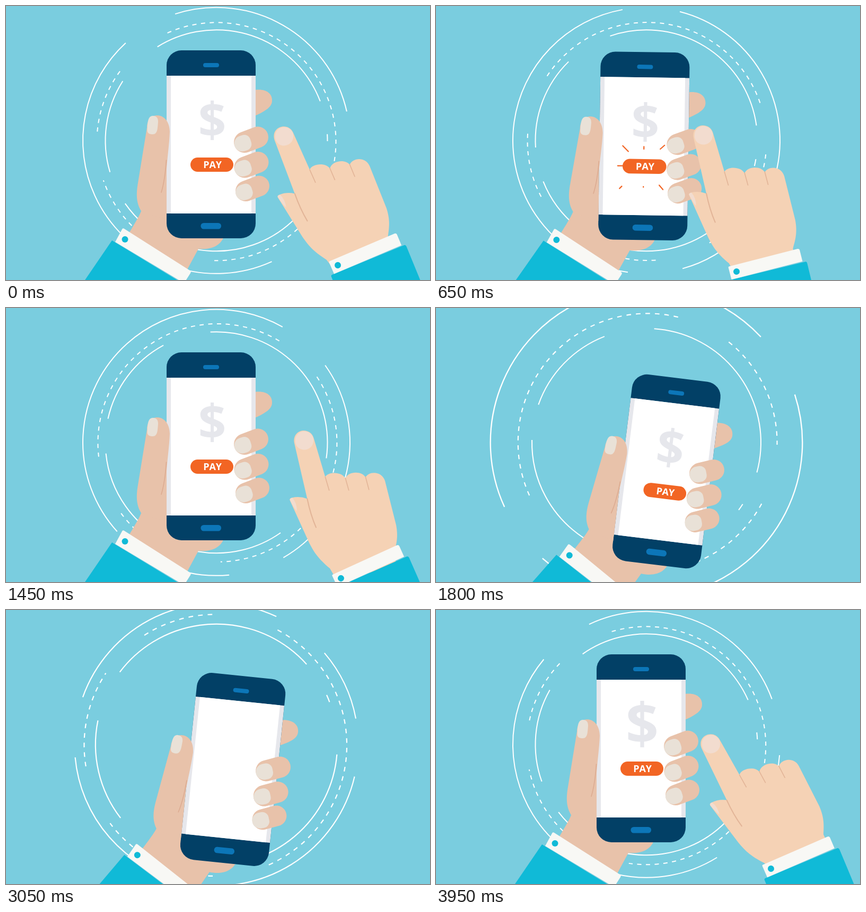
An HTML page with a canvas that plays this animation: 800x519 px, repeating every 4000 ms.

```html
<!DOCTYPE html>
<html lang="en">
<head>
<meta charset="utf-8">
<title>Mobile payment</title>
<style>
html, body { margin: 0; width: 100%; height: 100%; overflow: hidden; background: #7acddf; }
canvas { display: block; width: 800px; height: 519px; }
</style>
</head>
<body>
<canvas id="stage" width="800" height="519"></canvas>
<script>
const ctx = document.getElementById('stage').getContext('2d');
const LOOP = 4000, STEP = 50;
const RAD = Math.PI / 180;
const FONT = '"Open Sans", "Noto Sans", sans-serif';
const COLOR = {
  sky: '#7acddf', navy: '#024066', blue: '#0c76b8', bezel: '#e6e7ec', orange: '#f26524',
  skin: '#e8c2aa', crease: '#dcab91', nail: '#e9e1d7',
  skin2: '#f5d2b5', crease2: '#e2b497', nail2: '#f2dccf',
  cuff: '#f8f8f5', teal: '#10bad7'
};

const clamp = u => Math.max(0, Math.min(1, u));
const smooth = u => u * u * (3 - 2 * u);
const mix = (a, b, u) => a + (b - a) * u;
const backIn = (u, s) => (s + 1) * u ** 3 - s * u ** 2;
const backOut = (u, s = 1.70158) => 1 - backIn(1 - u, s);

// Eased interpolation through rows of [time, ...values].
function track(rows, t) {
  const i = rows.findIndex(row => row[0] > t);
  if (i === 0) return rows[0].slice(1);
  if (i < 0) return rows[rows.length - 1].slice(1);
  const a = rows[i - 1], b = rows[i];
  const u = smooth((t - a[0]) / (b[0] - a[0]));
  return a.slice(1).map((v, k) => mix(v, b[k + 1], u));
}

function group(draw) {
  ctx.save();
  draw();
  ctx.restore();
}

function rotateAbout(x, y, degrees) {
  ctx.translate(x, y);
  ctx.rotate(degrees * RAD);
  ctx.translate(-x, -y);
}

function scaleAbout(x, y, s) {
  ctx.translate(x, y);
  ctx.scale(s, s);
  ctx.translate(-x, -y);
}

function fill(path, color) {
  ctx.fillStyle = color;
  ctx.fill(new Path2D(path));
}

function stroke(path, color, width) {
  ctx.strokeStyle = color;
  ctx.lineWidth = width;
  ctx.lineCap = 'round';
  ctx.stroke(new Path2D(path));
}

function box(x, y, w, h, r, color) {
  ctx.fillStyle = color;
  ctx.beginPath();
  ctx.roundRect(x, y, w, h, r);
  ctx.fill();
}

function dot(x, y, r, color) {
  ctx.fillStyle = color;
  ctx.beginPath();
  ctx.arc(x, y, r, 0, 2 * Math.PI);
  ctx.fill();
}

// ---------- rings ----------
const RINGS = [
  { r: 252, speed: 50, exit: [1600, 520, 2.47], enter: 2850,
    arcs: [[252, 347.4], [12, 41.8], [65.5, 227.2]] },
  { r: 225.5, speed: -50, exit: [1660, 470, 1.77], enter: 2800, shift: 2, dash: [8, 8.5],
    arcs: [[245.8, 375], [38.8, 91], [118.3, 161], [184.8, 217.6]] },
  { r: 209.5, speed: 20, exit: [1720, 420, 1.29], enter: 2750,
    arcs: [[237.9, 339.2], [356.7, 360.3], [25.7, 145.3], [163.4, 212.5]] }
];

function ringScale(ring, t) {
  if (t >= 2700) return backOut(clamp((t - ring.enter) / 450));
  const [start, length, s] = ring.exit;
  return 1 - backIn(clamp((t - start) / length), s);
}

function drawRing(ring, t) {
  const s = ringScale(ring, t);
  if (s < 0.01) return;
  const spin = t < 2700 ? t : t - LOOP - 98;
  group(() => {
    ctx.translate(397, 254.8);
    ctx.scale(s, s);
    ctx.rotate(ring.speed * spin / 1000 * RAD);
    ctx.translate(0, ring.shift || 0);
    ctx.strokeStyle = '#fff';
    ctx.lineWidth = 2;
    ctx.setLineDash(ring.dash || []);
    for (const [from, to] of ring.arcs) {
      ctx.beginPath();
      ctx.arc(0, 0, ring.r, from * RAD, to * RAD);
      ctx.stroke();
    }
  });
}

// ---------- phone ----------
// Outer end relative to the button, direction inward, full length.
const RAYS = [
  [-42, -38, 45, 25], [-2, -37, 90, 8], [37, -40, 138, 18], [-51, 0, 0, 17],
  [-47, 43, -45, 10], [-2, 40, -90, 2], [35, 44, -131, 18]
];

function drawRays(t) {
  const p = (t - 500) / 215;
  if (p <= 0 || p >= 1) return;
  const head = 1 - clamp(p * 2), tail = 1 - clamp(p * 2 - 1);
  for (const [x, y, angle, length] of RAYS) {
    const dx = Math.cos(angle * RAD) * length, dy = Math.sin(angle * RAD) * length;
    const at = k => `${389 + x + dx * k} ${300 + y + dy * k}`;
    stroke(`M${at(head)}L${at(tail)}`, COLOR.orange, 2.2);
  }
}

function drawDollar(t) {
  const s = t < 2700 ? 1 : backOut(clamp((t - 3650) / 450), 2.9);
  if (s <= 0) return;
  group(() => {
    ctx.translate(389, 216);
    ctx.scale(s, s);
    ctx.font = `bold 92px ${FONT}`;
    ctx.textAlign = 'center';
    ctx.fillStyle = COLOR.bezel;
    const m = ctx.measureText('$');
    ctx.fillText('$', 0, (m.actualBoundingBoxAscent - m.actualBoundingBoxDescent) / 2);
  });
}

const PRESS = [[420, 1], [480, 0.9], [590, 1.05], [650, 1.02], [760, 1]];

function drawButton(t) {
  const s = t < 2700 ? track(PRESS, t)[0] : backOut(clamp((t - 3335) / 400));
  if (s <= 0) return;
  group(() => {
    scaleAbout(388.5, 300.5, s);
    box(348, 287, 81, 27, 13.5, COLOR.orange);
    ctx.font = `bold 18px ${FONT}`;
    ctx.letterSpacing = '0.8px';
    ctx.textAlign = 'center';
    ctx.fillStyle = '#fff';
    ctx.fillText('PAY', 390, 307);
  });
}

function drawPhone(t) {
  box(303, 84, 168, 356, 28, COLOR.navy);
  box(303, 132, 168, 261, 0, COLOR.bezel);
  box(311, 132, 152, 261, 0, '#fff');
  box(372, 108, 30, 8, 4, COLOR.blue);
  box(367.5, 411, 38.5, 11.5, 5.5, COLOR.blue);
  drawDollar(t);
  drawRays(t);
  drawButton(t);
}

// ---------- holding hand ----------
function drawFinger(x, y, r) {
  ctx.lineCap = 'round';
  stroke(`M${x} ${y}L${x + 25} ${y - 9.5}`, COLOR.skin, 2 * r);
  group(() => {
    ctx.translate(x - 3, y + 2);
    ctx.rotate(-18 * RAD);
    box(-16.5, -15, 32, 30, [15, 12, 12, 15], COLOR.nail);
  });
}

function drawHoldingArm() {
  fill('M200 444 L336 527 L215 720 L60 650 L149 519Z', COLOR.teal);
  fill('M219.5 422 Q221 420.5 224 422.5 L347 501 Q350 503 348 506 L336 525 L206 447Z', COLOR.cuff);
  dot(224.5, 442, 6, COLOR.teal);
}

function holdAngle(t) {
  if (t < 2700) return 7 * Math.max(0, (t - 1650) / 150) ** 2;
  return 58 * (1 - backOut(clamp((t - 2850) / 680)));
}

const RECOIL = [[380, 0], [520, 0.95], [650, 0.8], [950, 0]];

function drawHolding(t) {
  if (t >= 2150 && t <= 2850) return;
  const angle = holdAngle(t);
  const pivot = (x, y, a) => angle < 0 ? rotateAbout(x, y, a) : rotateAbout(22, 678, angle);
  group(() => {
    rotateAbout(157, 646, track(RECOIL, t)[0]);
    group(() => {
      pivot(181, 470, angle);
      fill('M465 160 C488 155 502 164 502 179 C502 190 493 198 465 210Z', COLOR.skin);
      fill('M262 365 C256 395 246 405 226 441 L335 512 L363 460 C386 462 406 455 412 434 L330 330Z', COLOR.skin);
    });
    group(() => {
      pivot(14, 563, angle * 0.48);
      drawHoldingArm();
    });
    group(() => {
      pivot(181, 470, angle);
      drawPhone(t);
      fill('M266 230 C266 199 308 198 309 238 C308 264 304 290 303 310 V405 L257 391 C246 376 245 358 249 335Z', COLOR.skin);
      fill('M266.5 233 C267 217 269 208 277 208 C284 208 287 212 287 219 C286 232 286 243 277 243 C270 243 266 241 266.5 233Z', COLOR.nail);
      stroke('M302.5 292 Q300 330 293 353', COLOR.crease, 1.6);
      drawFinger(450, 258, 20);
      drawFinger(450.5, 305.5, 20);
      drawFinger(452.5, 350.5, 19.5);
    });
  });
}

// ---------- tapping hand ----------
// time, fingertip x, y, hand angle, cuff button x, y, arm angle
const TAP = [
  [0, 524, 247, -6.2, 626, 491, -7.2],
  [430, 420, 306, -4, 510, 553, -6],
  [510, 420, 306, -4, 510, 553, -6],
  [650, 504, 245, 1.5, 567, 503, 1.5],
  [1000, 560, 247, 1.5, 628, 506, -5],
  [1450, 562, 251, 1.4, 632, 512, -8.7],
  [1750, 700, 640, 8, 790, 890, 5],
  [2950, 700, 640, 8, 790, 890, 5],
  [3350, 581, 182, 0, 652, 436, 0],
  [3950, 518, 254, -11.4, 632, 490, -7.6],
  [4000, 520, 252, -9.7, 630, 490, -7.5]
];

function drawTapHand() {
  fill('M563 187 C558 160 593 155 599.5 177 L623 250 C628 239 655 239 661 252 C666 237 693 237 699 249 '
    + 'C705 236 730 236 736 255 L759 338 C764 362 760 376 756 392 L762 415 L650 446 L636 423 '
    + 'C612 404 604 391 595 374 L557.5 296 Q556 292 561 291 Q575 287 590 292Z', COLOR.skin2);
  fill('M565 186 C562 160 594 158 599 178 C602 203 569 207 565 186Z', COLOR.nail2);
  fill('M557.5 295 Q557 292 562 291 Q571 301 571 316 Q565 310 557.5 295Z', COLOR.nail2);
  stroke('M590 292 Q597 322 608 346', COLOR.crease2, 2);
  stroke('M623 250 L631 275', COLOR.crease2, 1.6);
  stroke('M661 251 L668 274', COLOR.crease2, 1.6);
  stroke('M699 248 L706 272', COLOR.crease2, 1.6);
}

function drawTapArm() {
  fill('M637 455 Q637 453 639 452.5 L781 414 Q784 413.5 785 417 L850 660 L692 670Z', COLOR.teal);
  fill('M636.5 429 Q636 427 638 426.5 L766 390 Q769 389.5 770 392 L776 413.5 L643 451.5Z', COLOR.cuff);
  dot(652, 436, 6, COLOR.teal);
}

function drawTapping(t) {
  if (t >= 1750 && t <= 2950) return;
  const [tipX, tipY, handAngle, armX, armY, armAngle] = track(TAP, t);
  const place = (x, y, angle, homeX, homeY, draw) => group(() => {
    ctx.translate(x, y);
    ctx.rotate(angle * RAD);
    ctx.translate(-homeX, -homeY);
    draw();
  });
  place(tipX, tipY, handAngle, 581, 182, drawTapHand);
  place(armX, armY, armAngle, 652, 436, drawTapArm);
}

// ---------- loop ----------
function render(t) {
  ctx.fillStyle = COLOR.sky;
  ctx.fillRect(0, 0, 800, 519);
  for (const ring of RINGS) drawRing(ring, t);
  drawHolding(t);
  drawTapping(t);
}

const begin = performance.now();
function tick() {
  const t = (performance.now() - begin) % LOOP;
  render(Math.floor(t / STEP) * STEP);
  requestAnimationFrame(tick);
}
tick();
</script>
</body>
</html>
```
